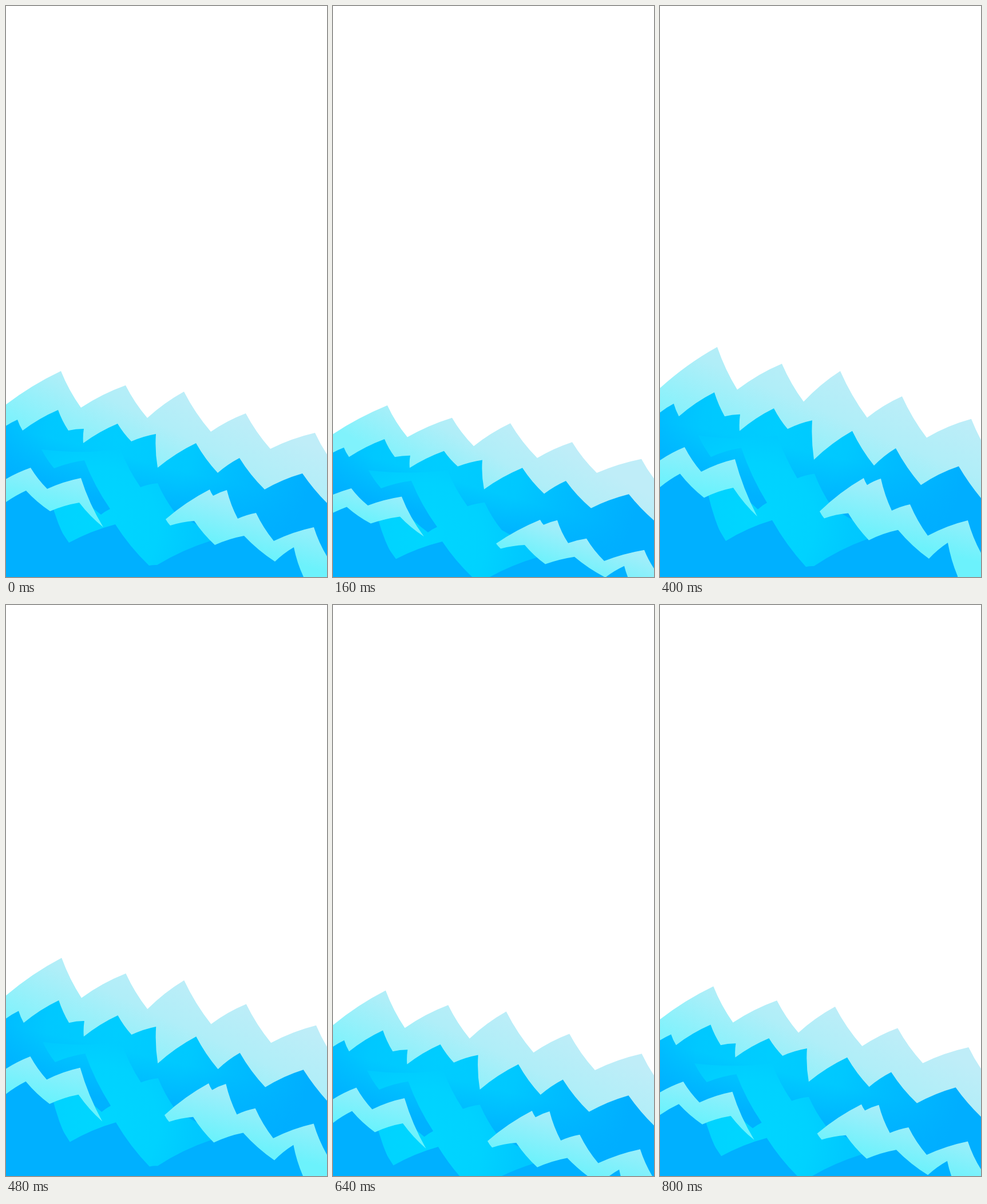
Recreate the animation shown at these times as an HTML page with a canvas. Size 561 by 998 pixels, loop 880 ms.

```html
<!DOCTYPE html>
<html lang="en">
<head>
<meta charset="utf-8">
<title>Waves</title>
<style>
html, body { margin: 0; width: 100%; height: 100%; overflow: hidden; background: #fff; }
canvas { display: block; }
</style>
</head>
<body>
<canvas id="stage" width="561" height="998"></canvas>
<script>
const ctx = document.getElementById('stage').getContext('2d');
const W = 561, H = 998, STEP = 80, COUNT = 11, BOW = .06;

// The swell all layers share: squash > 0 sinks them, < 0 lifts them.
const SWELL = [
  { at: 0, squash: 0, shift: 0, bend: 0 },
  { at: 2, squash: 1, shift: 0, bend: 0 },
  { at: 4, squash: 1, shift: 15, bend: 0 },
  { at: 5, squash: -1, shift: 0, bend: 0 },
  { at: 7, squash: -.12, shift: 4.5, bend: -4 },
  { at: 8, squash: -.15, shift: 42, bend: -9 },
  { at: 10, squash: .1, shift: 22.5, bend: -5 }
];

// How each layer answers a full sink or lift: [dx, dy at top, dy per pixel below].
const LAYERS = {
  sea: { top: 638, sink: [-1, 60, -.132], lift: [4, -42, .165] },
  left: { top: 807, sink: [-11, 36, -.19], lift: [0, -36, .165] },
  right: { top: 845, sink: [6, 53, -.2], lift: [0, -20, .12] },
  front: { top: 907, sink: [0, 30, -.05], lift: [5, -7, .13] }
};

// Peaks and valleys; the edges between them are bowed by trace().
const toFloor = ridge => [...ridge, [W + 16, H + 100], [-12, H + 100]];
const BACK = toFloor([
  [-12, 706], [96, 638], [131, 702], [209, 663], [247, 720], [311, 674],
  [358, 744], [419, 712], [462, 774], [540, 746], [577, 806]]);
const MID = toFloor([
  [-12, 742], [20, 723], [29, 742], [91, 706], [109, 742], [136, 739], [135, 764],
  [195, 730], [219, 761], [262, 748], [265, 807], [332, 764], [370, 816],
  [408, 790], [452, 845], [518, 817], [577, 884]]);
const FRONT = toFloor([
  [-12, 868], [35, 841], [77, 878], [110, 938], [191, 906], [250, 978], [264, 977],
  [357, 935], [412, 920], [470, 962], [500, 945], [577, 985]]);
const GLOW = [
  [62, 775], [84, 808], [137, 794], [182, 879], [166, 889], [125, 850], [78, 862],
  [110, 945], [110, 1100], [390, 1100], [390, 930], [295, 885], [265, 834],
  [235, 841], [200, 775]];
const FOAM_LEFT = [
  [-12, 834], [43, 807], [72, 844], [131, 825], [170, 911],
  [128, 868], [77, 883], [35, 847], [-12, 876]];
const FOAM_RIGHT = [
  [279, 897], [356, 845], [362, 856], [386, 846], [405, 896], [437, 886],
  [468, 935], [538, 911], [561, 962], [600, 1080], [544, 1080], [520, 998],
  [503, 946], [470, 971], [416, 926], [365, 942], [329, 900], [287, 908]];

const mix = (a, b, f) => a + (b - a) * f;

function swellAt(step) {
  const j = Math.max(1, SWELL.findIndex(k => k.at >= step));
  const a = SWELL[j - 1], b = SWELL[j], f = (step - a.at) / (b.at - a.at);
  return {
    squash: mix(a.squash, b.squash, f),
    shift: mix(a.shift, b.shift, f),
    bend: mix(a.bend, b.bend, f)
  };
}

function mapper({ top, sink, lift }, { squash, shift, bend }) {
  const [dx, dy, grow] = (squash > 0 ? sink : lift).map(v => v * Math.abs(squash));
  return (x, y) => [
    x + dx + bend * Math.sin(Math.PI * x / W),
    y + dy + shift + grow * (y - top)
  ];
}

// Climbing edges bulge up, falling edges sag.
function trace(points, map) {
  ctx.beginPath();
  ctx.moveTo(...map(...points[0]));
  points.forEach(([x, y], i) => {
    const [x2, y2] = points[(i + 1) % points.length];
    const dx = x2 - x, dy = y2 - y;
    const bow = BOW * Math.sign(dx) * (dx * dy < 0 ? 1 : -1);
    ctx.quadraticCurveTo(
      ...map((x + x2) / 2 + bow * dy, (y + y2) / 2 - bow * dx), ...map(x2, y2));
  });
}

function fill(points, map, style) {
  trace(points, map);
  ctx.fillStyle = style;
  ctx.fill();
}

function addStops(gradient, stops) {
  for (const [at, color] of stops) gradient.addColorStop(at, color);
  return gradient;
}
const linear = (map, from, to, ...stops) =>
  addStops(ctx.createLinearGradient(...map(...from), ...map(...to)), stops);
function radial(map, center, r, ...stops) {
  const [x, y] = map(...center);
  return addStops(ctx.createRadialGradient(x, y, 0, x, y, r), stops);
}

function draw(step) {
  const swell = swellAt(step);
  const [sea, left, right, front] = Object.values(LAYERS).map(l => mapper(l, swell));
  ctx.clearRect(0, 0, W, H);

  fill(BACK, sea, linear(sea, [300, 650], [204, 842],
    [0, '#bfedf8'], [.4, '#b0eef8'], [.9, '#80f2fc']));
  fill(MID, sea, radial(sea, [200, 760], 340,
    [0, '#00cdff'], [.38, '#00c8ff'], [.6, '#00bdff'], [1, '#00aeff']));
  fill(MID, sea, linear(sea, [200, 785], [180, 865],
    [0, 'rgba(0,174,255,0)'], [1, 'rgba(0,174,255,.85)']));
  fill(GLOW, front, radial(front, [160, 910], 210,
    [0, '#00d6ff'], [.5, '#00d2ff'], [.8, '#00c9ff'], [1, '#00c6ff']));
  fill(FRONT, front, '#00b0ff');
  fill(FOAM_LEFT, left, linear(left, [60, 808], [42, 884],
    [0, '#94effb'], [1, '#62f3fd']));
  fill(FOAM_RIGHT, right, linear(right, [356, 848], [334, 928],
    [0, '#a2eefa'], [1, '#6cf2fc']));
}

let shown = -1;
const start = performance.now();
function tick() {
  const step = Math.floor((performance.now() - start) / STEP) % COUNT;
  if (step !== shown) draw(shown = step);
  requestAnimationFrame(tick);
}
tick();
</script>
</body>
</html>
```
